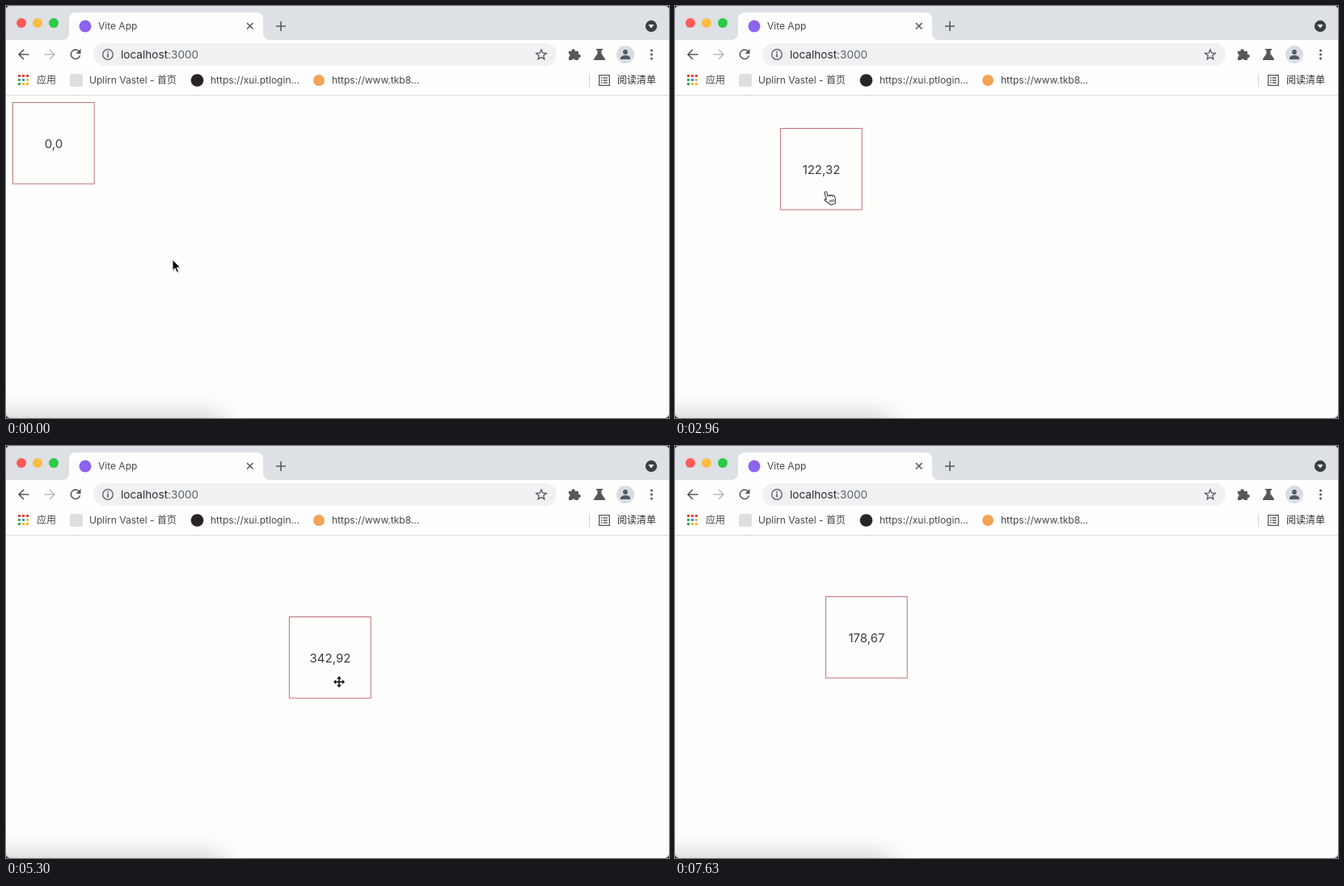
An HTML page for the animation above (9.03 s loop, 820 by 510 pixels).

```html
<!DOCTYPE html>
<html lang="zh">
<head>
<meta charset="utf-8">
<title>Drag</title>
<style>
  html, body { margin: 0; width: 100%; height: 100%; overflow: hidden; background: #2a2a2a; }
  #win { position: relative; width: 820px; height: 510px; overflow: hidden; border-radius: 5px; background: #fefefd; }
  #glow { position: absolute; left: -60px; top: 511px; width: 328px; height: 40px; box-shadow: 0 0 34px rgba(0, 0, 0, .26); }
  svg { position: absolute; left: 0; top: 0; display: block; }
  .ui { font: 12px Inter, "Noto Sans CJK SC", "Noto Sans CJK", sans-serif; fill: #45484c; }
  .line { fill: none; stroke: #55595e; stroke-width: 1.6; }
  .thin { stroke-width: 1.3; }
  .solid { fill: #55595e; }
  #label { font-size: 15px; fill: #383b40; text-anchor: middle; }
</style>
</head>
<body>
<div id="win">
<div id="glow"></div>
<svg width="820" height="510" viewBox="0 0 820 510">
  <!-- tab strip -->
  <rect width="820" height="42" fill="#dde0e4"/>
  <circle cx="19" cy="21" r="6" fill="#fc5b57"/>
  <circle cx="39" cy="21" r="6" fill="#fdbc40"/>
  <circle cx="59" cy="21" r="6" fill="#2bcb45"/>
  <path d="M70 42a8 8 0 0 0 8-8V16a8 8 0 0 1 8-8H310a8 8 0 0 1 8 8V34a8 8 0 0 0 8 8z" fill="#fefefe"/>
  <circle cx="98" cy="25" r="7.5" fill="#8b63ee"/>
  <text class="ui" x="114" y="29">Vite App</text>
  <path class="line" d="M298 21l7.5 7.5m0-7.5l-7.5 7.5"/>
  <path class="line" d="M334 25h12m-6-6v12"/>
  <circle cx="798" cy="25" r="7.2" fill="#3c4043"/>
  <path d="M794.5 23h7l-3.5 4.5z" fill="#fff"/>

  <!-- toolbar -->
  <rect y="42" width="820" height="68" fill="#fefefe"/>
  <path class="line" d="M28.5 60H16m6-6l-6 6 6 6"/>
  <path class="line" d="M47.5 60H60m-6-6l6 6-6 6" style="stroke:#b9bbbe"/>
  <path class="line" d="M91 57a5.7 5.7 0 1 0 .5 4.5"/>
  <path class="solid" d="M92.500 53v6h-6z"/>
  <rect x="108" y="46" width="573" height="28" rx="14" fill="#eff1f3"/>
  <circle class="line thin" cx="126" cy="60" r="6.3"/>
  <path class="solid" d="M125.200 59h1.600v4.500h-1.600zm0-2.700h1.600v1.600h-1.600z"/>
  <text x="142" y="65" class="ui" style="font-size:13.600px;fill:#2a2c30">localhost<tspan fill="#5f6368">:3000</tspan></text>
  <path id="star" class="line thin"/>
  <path class="solid" d="M696 56h3.500a2.200 2.200 0 1 1 4.200 0H708v4a2.200 2.200 0 1 1 0 4.200V67h-3.800a2.200 2.200 0 0 0-4.200 0H696v-3.800a2.200 2.200 0 0 0 0-4.200z"/>
  <path class="solid" d="M730 53h8v1.700h-1.500V59l4.500 6.500q.5 1.500-1 1.500H728q-1.500 0-1-1.500L731.500 59v-4.300H730z"/>
  <circle cx="766" cy="60" r="11" fill="#d9dde2"/>
  <circle cx="766" cy="57" r="2.900" fill="#535b68"/>
  <path d="M760 66v-1.500c0-4.700 12-4.700 12 0V66z" fill="#535b68"/>
  <path d="M798.500 55v10.100" stroke="#55595e" stroke-width="3" stroke-linecap="round" stroke-dasharray="0 5"/>

  <!-- bookmarks -->
  <g id="apps"></g>
  <text class="ui" x="38" y="96">应用</text>
  <rect x="79" y="84" width="16" height="16" rx="3" fill="#dfdddd"/>
  <text class="ui" x="103" y="96">Uplirn Vastel - 首页</text>
  <circle cx="236.500" cy="92" r="7.800" fill="#2a2326"/>
  <text class="ui" x="253" y="96">https://xui.ptlogin...</text>
  <circle cx="387" cy="92" r="7" fill="#f1a455"/>
  <text class="ui" x="403" y="96">https://www.tkb8...</text>
  <path d="M721.500 84v16" stroke="#cfd1d4"/>
  <rect class="line thin" x="733.700" y="85.700" width="12.600" height="12.600"/>
  <path class="line thin" d="M736 89h1.600m1.200 0h5M736 92h1.600m1.200 0h5M736 95h1.600m1.200 0h5"/>
  <text class="ui" x="756" y="96" style="fill:#2c2e31">阅读清单</text>
  <path d="M0 110.500H820" stroke="#dadbdc"/>

  <!-- draggable box -->
  <g id="box">
    <rect x=".4" y=".5" width="100.800" height="100.600" fill="none" stroke="#c16e77"/>
    <text id="label" class="ui" x="51" y="56.600"></text>
  </g>

  <!-- pointers -->
  <g id="arrow">
    <path d="M1 2V15l3-2.700 2.200 4.900 2.300-1-2.200-4.700H10.500z" opacity=".2"/>
    <path d="M0 0V13.500l3.100-2.900 2.200 5 2.200-1-2.200-4.800H9.600z" fill="#0a0a0a" stroke="#fff" stroke-width=".9"/>
  </g>
  <g id="hand">
    <path transform="translate(-1 0) rotate(-16) scale(1.080) translate(-4.900 -1)" d="M3.600 10V2.200a1.300 1.300 0 0 1 2.600 0V7a1.200 1.200 0 0 1 2.500 0v.6a1.200 1.200 0 0 1 2.500.2v.6a1.200 1.200 0 0 1 2.400.3V12c0 2-1.400 3-1.400 5H6.200c0-2-3-4-4.600-6.600-.8-1.400.8-2.300 2-.4zM7.200 11.500v3m2-3v3m2-3v3" fill="#fff" stroke="#3a3c40" stroke-linejoin="round"/>
  </g>
  <g id="move"></g>
</svg>
</div>
<script>
const $ = id => document.getElementById(id);
const range = n => [...Array(n).keys()];

// icons built by rule
const tints = ['#e8453c', '#3aa757', '#4688f1', '#f9bb2d'];
$('apps').innerHTML = range(9).map(i => {
  const col = i % 3, row = (i - col) / 3;
  const tint = tints[row === 0 ? 0 : row === 1 ? col + 1 : col ? 3 : 1];
  return `<rect x="${15 + col * 5}" y="${85 + row * 5}" width="3" height="3" fill="${tint}"/>`;
}).join('');

$('star').setAttribute('d', 'M' + range(10).map(i => {
  const a = i * Math.PI / 5, r = i % 2 ? 2.9 : 6.6;
  return [662 + r * Math.sin(a), 60.5 - r * Math.cos(a)];
}).join('L') + 'z');

const arms = style => range(4).map(i =>
  `<path transform="rotate(${i * 90})" d="M-.8 0V-3.800H-3L0-7 3-3.800H.8V0z" ${style}/>`).join('');
$('move').innerHTML = arms('fill="none" stroke="#fff" stroke-width="2"') + arms('fill="#111"');

const LOOP = 9030, STEP = 200 / 3;
const ENTRY = { to: 100, grab: [198, 195] };

// path: cubic curve of the box; rest and grab: pointer before and during the drag, from the box corner
const drags = [
  { from: 1840, to: 2800, rest: [66, 82], grab: [64, 85], path: [[0, 0], [200, 20], [231, 89], [122, 32]] },
  { from: 3760, to: 4430, rest: [57, 79], grab: [48, 81], path: [[122, 32], [90, 45], [67, 64], [50, 59]] },
  { from: 4760, to: 5600, rest: [48, 81], grab: [62, 81], path: [[50, 59], [150, 60], [471, 105], [355, 106]] },
  { from: 6900, to: 7630, rest: [39, 83], grab: [39, 83], path: [[355, 106], [200, 60], [-69, 65], [178, 67]] }
];

const clamp = p => Math.min(1, Math.max(0, p));
const mix = (a, b, p) => a.map((v, i) => v + (b[i] - v) * p);

// repeated mixing of neighbours gives the point on the curve
function curve(pts, p) {
  while (pts.length > 1) pts = pts.slice(1).map((b, i) => mix(pts[i], b, p));
  return pts[0].map(Math.round);
}

function pose(t) {
  const i = drags.findIndex(d => t < d.to);
  const d = drags.at(i), last = drags[i - 1] || ENTRY;
  const box = curve(d.path, clamp((t - d.from) / (d.to - d.from)));
  if (i < 0) return { box, hold: d.grab, kind: '' };
  // 4 ms a pixel to the resting place, then a short move to the grab point
  const travel = 4 * Math.hypot(d.rest[0] - last.grab[0], d.rest[1] - last.grab[1]) + 1;
  const rest = mix(last.grab, d.rest, clamp((t - last.to) / travel));
  const hold = mix(rest, d.grab, clamp((t - d.from) / 200 + 1));
  const kind = t >= d.from ? 'move' : Math.max(...hold) < 102 ? 'hand' : 'arrow';
  return { box, hold, kind };
}

const place = (el, x, y) => el.setAttribute('transform', `translate(${x} ${y})`);

function draw(ms) {
  // 15 pictures a second, on a 10 ms clock
  const k = Math.floor((ms - 25) / STEP);
  const t = Math.round((30 + k * STEP) / 10) * 10;
  const { box, hold, kind } = pose(t);
  const x = 8 + box[0], y = 119 + box[1];
  place($('box'), x, y);
  $('label').textContent = box.join();
  for (const id of ['arrow', 'hand', 'move']) {
    $(id).style.display = id === kind ? '' : 'none';
    place($(id), x + hold[0], y + hold[1]);
  }
}

const start = performance.now();
function tick() {
  draw((performance.now() - start) % LOOP);
  requestAnimationFrame(tick);
}
tick();
</script>
</body>
</html>
```
